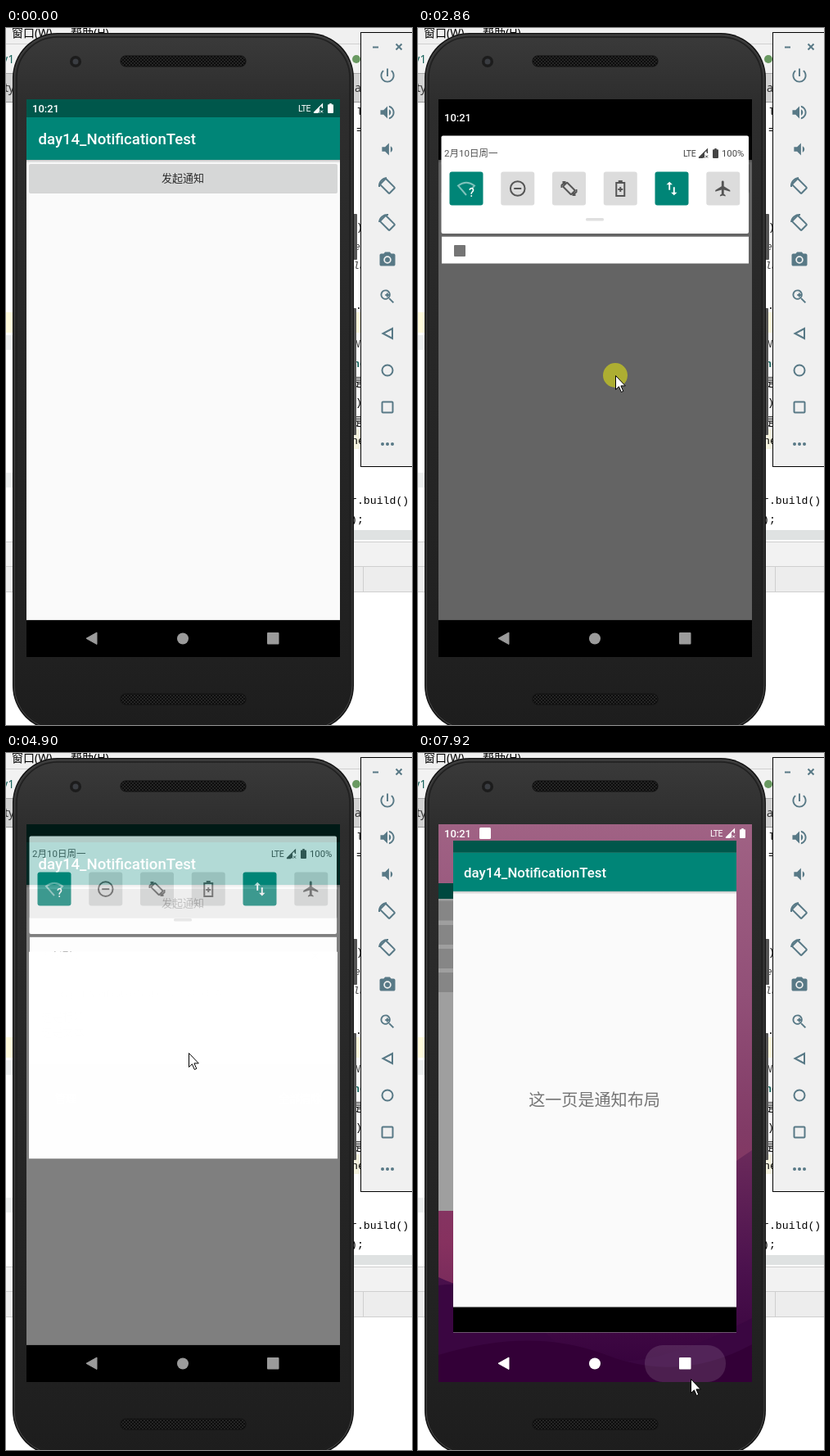
These frames come from a looping animation (496 px wide and 851 px high, 8000 ms). An HTML page:

```html
<!DOCTYPE html>
<html lang="zh-CN">
<head>
<meta charset="utf-8">
<title>Notification demo</title>
<style>
html, body { margin: 0; width: 100%; height: 100%; overflow: hidden; background: #fff; }
svg { display: block; width: 496px; height: 851px; }
text { font-family: Roboto, "Noto Sans CJK SC", "Noto Sans CJK JP", sans-serif; white-space: pre; }
.ide text { font-family: "Noto Sans", "Noto Sans CJK SC", sans-serif; font-size: 14px; }
.code text { font-family: "Liberation Mono", "Noto Sans CJK SC", monospace; font-size: 13.2px; }
.line { fill: none; stroke: currentColor; stroke-width: 2; }
.tools { color: #587986; fill: currentColor; }
.med { font-weight: 500; }
</style>
</head>
<body>
<svg viewBox="0 0 496 851">
<defs>
  <linearGradient id="body" x1="0" y1="0" x2="0" y2="1">
    <stop offset="0" stop-color="#3a3a3a"/><stop offset=".1" stop-color="#2d2d2d"/>
    <stop offset=".9" stop-color="#202020"/><stop offset="1" stop-color="#1d1d1d"/>
  </linearGradient>
  <linearGradient id="sky" x1="0" y1="0" x2="0" y2="1">
    <stop offset="0" stop-color="#a06284"/><stop offset=".3" stop-color="#925078"/>
    <stop offset=".55" stop-color="#813b66"/><stop offset=".75" stop-color="#86315f"/>
    <stop offset="1" stop-color="#5d1e54"/>
  </linearGradient>
  <linearGradient id="hill" x1="0" y1="0" x2="0" y2="1">
    <stop offset="0" stop-color="#6b2a5b"/><stop offset=".5" stop-color="#4c124e"/>
    <stop offset="1" stop-color="#33003a"/>
  </linearGradient>
  <linearGradient id="fade" x1="0" y1="0" x2="0" y2="1">
    <stop offset="0" stop-opacity=".22"/><stop offset="1" stop-opacity="0"/>
  </linearGradient>
  <pattern id="mesh" width="4" height="4" patternUnits="userSpaceOnUse">
    <rect width="4" height="4" fill="#252525"/>
    <circle cx="1" cy="1" r="1" fill="#050505"/><circle cx="3" cy="3" r="1" fill="#050505"/>
  </pattern>
  <clipPath id="screen"><rect x="25" y="87" width="383" height="681"/></clipPath>
  <clipPath id="cardClip"><rect id="cardBox" x="29" y="254.500" width="375" height="33"/></clipPath>
  <clipPath id="winClip"><rect id="winBox"/></clipPath>
  <g id="bars">
    <rect x="25" y="87" width="383" height="681" fill="#fafafa"/>
    <rect x="25" y="87" width="383" height="22" fill="#00574b"/>
    <rect x="25" y="109" width="383" height="52" fill="#008577"/>
    <rect x="25" y="161" width="383" height="4" fill="url(#fade)"/>
    <text class="med" x="39.500" y="142" font-size="18.600" fill="#fff">day14_NotificationTest</text>
    <rect x="25" y="722" width="383" height="1" fill="#ddd"/>
    <rect x="25" y="723" width="383" height="45"/>
  </g>
  <g id="signal">
    <path d="M11 1V5M1 11.500L11.500 1V6M1 11.500H6" fill="none" stroke="currentColor" stroke-width="1.200"/>
    <path d="M1 11.500L8 4.500V11.500Z" fill="currentColor"/>
    <path d="M9 8.500l3 3m0-3l-3 3" stroke="currentColor"/>
  </g>
  <path id="cell" d="M2.300 0h2.400v1.300H6q1 0 1 1V11q0 1-1 1H1q-1 0-1-1V2.300q0-1 1-1h1.300z"/>
  <g id="turn">
    <rect class="line" x="-5" y="-8" width="10" height="16" rx="1" transform="rotate(-45)"/>
    <path class="line" d="M-10 1A10 10 0 0 1-1-10" stroke-width="1.600"/>
  </g>
</defs>

<g class="ide">
  <rect width="496" height="851" fill="#fff"/>
  <rect width="496" height="19" fill="#f0f0f0"/>
  <rect y="19" width="496" height="1" fill="#d0d0d0"/>
  <rect y="20" width="496" height="35" fill="#f2f2f2"/>
  <rect y="55" width="496" height="36" fill="#d2d2d2"/>
  <rect y="55" width="496" height="1" fill="#aaa"/><rect y="90" width="496" height="1" fill="#999"/>
  <text x="7" y="11" font-size="14.500">窗口(W)</text><text x="79" y="11">帮助(H)</text>
  <text x="-5" y="43" fill="#17635c">y1</text><text x="-2" y="78" fill="#333">ty</text>
  <text x="426" y="78" fill="#333">a</text>
  <circle cx="428" cy="38" r="5" fill="#6a9a62"/>
  <rect y="347" width="496" height="25" fill="#fffbdc"/>
  <rect y="375" width="8" height="18" fill="#eef0f0"/><rect y="543" width="8" height="18" fill="#eef0f0"/>
  <rect x="408" y="490" width="30" height="24" fill="#f5f3df"/>
  <rect x="400" y="613" width="96" height="12" fill="#dfe2e2"/>
  <rect y="627" width="496" height="61" fill="#f2f2f2"/>
  <rect y="657" width="496" height="31" fill="#ededed"/>
  <path d="M0 627.500H496M0 657.500H496M0 688.500H496M436.500 658V688" stroke="#cfcfcf" fill="none"/>
  <g class="code" id="code"></g>
</g>

<g>
  <rect x="421" y="227" width="8" height="56" rx="1" fill="#555"/>
  <rect x="421" y="342" width="7" height="155" rx="1" fill="#555"/>
  <rect x="8" y="6" width="417" height="852" rx="55" fill="#151515"/>
  <rect x="10" y="8" width="413" height="848" rx="53" fill="url(#body)" stroke="#474747" stroke-width="1"/>
  <rect x="13" y="11" width="407" height="842" rx="50" fill="none" stroke="#1f1f1f" stroke-width="1.500"/>
  <circle cx="85" cy="41" r="7" fill="#1c1c1c"/><circle cx="85" cy="41" r="3.500" fill="#3a3d42"/>
  <rect x="140" y="34" width="153" height="13" rx="6" fill="url(#mesh)" stroke="#111"/>
  <rect x="140" y="813" width="153" height="13" rx="6" fill="url(#mesh)" stroke="#111"/>
</g>

<g clip-path="url(#screen)">
  <g id="home">
    <use href="#bars"/>
    <rect x="28" y="167" width="377" height="35" rx="2" fill="#bbb" opacity=".6"/>
    <rect x="28" y="166" width="377" height="35" rx="2" fill="#d6d7d7"/>
    <rect id="press" x="28" y="166" width="377" height="35" rx="2" fill="#c8c9c9"/>
    <text x="190" y="188.300" font-size="13" fill="#2b2b2b">发起通知</text>
  </g>

  <g id="wall">
    <rect x="25" y="87" width="383" height="681" fill="url(#sky)"/>
    <path d="M25 640Q130 690 250 600T408 485V768H25Z" fill="url(#hill)"/>
    <path d="M25 650Q90 640 160 712T408 690V768H25Z" fill="#3a0641"/>
    <path d="M25 735Q140 700 230 735T408 722V768H25Z" fill="#330037"/>
    <g id="past">
      <rect x="-300" y="159" width="343" height="400" fill="#9f9f9f"/>
      <rect x="-300" y="159" width="343" height="19" fill="#00483f"/>
      <path d="M-300 192.500H43M-300 222H43M-300 251H43M-300 280H43" stroke="#868686" stroke-width="24"/>
    </g>
  </g>

  <g id="shade">
    <rect id="scrim" x="25" y="87" width="383" height="636"/>
    <rect id="topDark" x="25" y="87" width="383" height="74"/>
    <text class="med" id="clock" x="32" y="114" font-size="13" fill="#fff">10:21</text>
    <g id="foot" font-size="13" fill="#fff">
      <text x="60" y="426">管理</text><text x="333" y="426">全部清除</text>
    </g>
    <g id="panel">
      <rect x="28.500" y="131.500" width="375.500" height="119.500" rx="2" fill="#fff"/>
      <text x="32" y="157.300" font-size="11.500" fill="#555">2月10日周一</text>
      <text x="324" y="157" font-size="10.500" letter-spacing="-.4" fill="#444">LTE</text>
      <use href="#signal" x="342" y="147" color="#444"/>
      <use href="#cell" x="360" y="147" fill="#444"/>
      <text x="371" y="157" font-size="11.300" fill="#444">100%</text>
      <g id="tiles"></g>
      <rect x="205" y="232" width="22" height="3.500" rx="1.500" fill="#e0e0e0"/>
      <g clip-path="url(#cardClip)">
        <rect x="29" y="254.500" width="375" height="400" fill="#fff"/>
        <rect id="dot" x="44" y="265" width="14" height="14" rx="1" fill="#757575"/>
        <g id="note" fill="#333">
          <text class="med" x="43" y="281.800" font-size="11.300">无声通知</text>
          <path d="M373.500 273.500l8 8m0-8l-8 8" stroke="#444" stroke-width="1.300"/>
          <rect x="29" y="299.500" width="375" height="1" fill="#ddd"/>
          <rect x="43.500" y="315" width="16.500" height="16.500" rx="1" fill="#757575"/>
          <text x="66" y="328" font-size="11.200">day14_NotificationTest • 这是小字 • 现在</text>
          <path d="M280 326q1-1 1-3.500a2.200 2.200 0 0 1 4.400 0q0 2.500 1 3.500zM282 327h2.500v1h-2.500zM278.500 321.500l1.500-2M288 321.500l-1.500-2" stroke="#555" stroke-width=".8" fill="#555"/>
          <text x="43" y="357" font-size="13.200">这是标题</text>
          <text x="43" y="375.500" font-size="13.200">这是文本</text>
        </g>
      </g>
    </g>
  </g>

  <g id="win"><g clip-path="url(#winClip)">
    <rect id="cover" x="25" y="87" width="383" height="681" fill="#fff"/>
    <g id="page">
      <use href="#bars"/>
      <text x="127" y="450.800" font-size="22.250" fill="#757575">这一页是通知布局</text>
    </g>
  </g></g>

  <g id="status" fill="#fff" color="#fff">
    <text class="med" x="32" y="103" font-size="13">10:21</text>
    <rect id="badge" x="75" y="91" width="14" height="14" rx="1.500"/>
    <text x="357" y="102" font-size="10.500" letter-spacing="-.5">LTE</text>
    <use href="#signal" x="375" y="92"/><use href="#cell" x="393" y="92"/>
  </g>
  <rect id="navBase" x="25" y="723" width="383" height="45"/>
  <rect id="pill" x="277" y="723" width="99" height="45" rx="22" fill="#fff"/>
  <g id="nav">
    <path d="M111 738V752.500L98 745.300Z" stroke="currentColor" stroke-width="1" stroke-linejoin="round" fill="currentColor"/>
    <circle cx="216" cy="745.500" r="7" fill="currentColor"/>
    <rect x="319" y="738" width="14.500" height="14.500" rx="1" fill="currentColor"/>
  </g>
</g>

<rect x="433.500" y="5.500" width="70" height="530" fill="#f0f0f0" stroke="#000"/>
<g class="tools" id="tools">
  <path class="line" d="M448 23.500h7M476.500 19.500l7 7m0-7l-7 7" stroke-width="1.300"/>
  <use href="#turn" x="466" y="193"/>
  <use href="#turn" transform="translate(466 238) scale(-1 1) rotate(90)"/>
  <circle cx="466" cy="283" r="3"/>
  <path class="line" d="M463.300 326h5m-2.500-2.500v5" stroke-width="1.200"/>
  <path class="line" d="M472 367V379L460.500 373Z" stroke-width="1.600"/>
  <circle class="line" cx="466" cy="418" r="6.500" stroke-width="1.600"/>
  <rect class="line" x="459.500" y="456.500" width="13" height="13" rx="1" stroke-width="1.600"/>
  <circle cx="460" cy="508" r="2"/><circle cx="466" cy="508" r="2"/><circle cx="472" cy="508" r="2"/>
</g>

<circle id="touch" r="15" fill="#adae32"/>
<path id="cursor" d="M.5.500V17.500L4.400 13.800L7.300 20.500L9.800 19.400L6.900 12.900H12.300Z" fill="#fff" stroke="#000" stroke-width="1"/>
</svg>

<script>
const el = {};
document.querySelectorAll('[id]').forEach(n => el[n.id] = n);

const icon = (d, x, y, s, fill) =>
  `<path transform="translate(${x} ${y}) scale(${s}) translate(-12 -12)" fill-rule="evenodd" fill="${fill}" d="${d}"/>`;

// Emulator toolbar
el.tools.insertAdjacentHTML('afterbegin', [
  [58, 'M13 3h-2v10h2V3zm4.830 2.170l-1.420 1.420C17.990 7.860 19 9.810 19 12c0 3.870-3.130 7-7 7s-7-3.130-7-7c0-2.190 1.010-4.140 2.580-5.420L6.170 5.170C4.230 6.820 3 9.260 3 12c0 4.970 4.030 9 9 9s9-4.030 9-9c0-2.740-1.230-5.180-3.170-6.830z'],
  [103, 'M3 9v6h4l5 5V4L7 9H3zm13.500 3c0-1.770-1.020-3.290-2.500-4.030v8.050c1.480-.73 2.500-2.250 2.500-4.020zM14 3.230v2.060c2.890.86 5 3.540 5 6.710s-2.110 5.850-5 6.710v2.060c4.010-.91 7-4.490 7-8.770s-2.990-7.860-7-8.770z'],
  [148, 'M18.500 12c0-1.770-1.020-3.290-2.500-4.030v8.050c1.480-.73 2.500-2.250 2.500-4.020zM5 9v6h4l5 5V4L9 9H5z'],
  [283, 'M9 2L7.170 4H4c-1.100 0-2 .9-2 2v12c0 1.100.9 2 2 2h16c1.100 0 2-.9 2-2V6c0-1.100-.9-2-2-2h-3.170L15 2H9zm3 15a5 5 0 1 1 0-10a5 5 0 1 1 0 10z'],
  [328, 'M15.500 14h-.79l-.28-.27A6.500 6.500 0 1 0 13.730 14.430l.27.28v.79l5 4.990L20.490 19zM9.500 14a4.500 4.500 0 1 1 0-9a4.500 4.500 0 1 1 0 9z']
].map(([y, d]) => icon(d, 466, y, .95, 'currentColor')).join(''));

// Quick settings
const tileArt = [
  `<path class="line" d="M0 8L-10-3.500Q0-11 10-3.500L7 0" stroke-width="1.300" opacity=".5"/>
   <text class="med" x="3" y="10" font-size="14" fill="#fff">?</text>`,
  `<circle class="line" r="8.800"/><path class="line" d="M-4.500 0h9"/>`,
  `<rect class="line" x="-3.500" y="-7" width="7" height="14" rx="1" transform="rotate(-45)" stroke-width="1.800"/>
   <path class="line" d="M-9-1V-4L-5-8M-8-8h3v3M9 1V4L5 8M8 8h-3v-3" stroke-width="1.500"/>`,
  `<path class="line" d="M-5-7H5V9H-5ZM-2.500-9h5M-3 1h6M0-2v6" stroke-width="1.900"/>`,
  icon('M16 17.010V10h-2v7.010h-3L15 21l4-3.990h-3zM9 3L5 6.990h3V14h2V6.990h3L9 3z', 0, 0, .93, 'currentColor'),
  icon('M21 16v-2l-8-5V3.500c0-.83-.67-1.500-1.500-1.500S10 2.670 10 3.500V9l-8 5v2l8-2.500V19l-2 1.500V22l3.500-1 3.500 1v-1.500L13 19v-5.500l8 2.500z', 0, 0, .95, 'currentColor')
];
el.tiles.innerHTML = tileArt.map((art, i) => {
  const on = i % 4 === 0;
  return `<g transform="translate(${59 + i * 62.75} 196)" color="${on ? '#fff' : '#555'}">
    <rect x="-20.500" y="-20.500" width="41" height="41" rx="3" fill="${on ? '#008577' : '#dcdcdc'}"/>${art}</g>`;
}).join('');

// Code peeking out beside the phone
const it = 'font-style="italic" fill="#444"', bold = 'font-weight="700" fill="#17635c"';
el.code.innerHTML = [
  [428, 106, 'l:'], [428, 128, '='], [428, 247, ')'], [425, 271, 'ei', it], [424, 294, 'la', it],
  [427, 343, '.'], [425, 390, 'N', it], [424, 414, 'ne', bold], [423, 437, '是'], [427, 461, ')'],
  [423, 485, '是'], [422, 508, 'ne'], [421, 581, 'r.build()'], [421, 604, ');']
].map(([x, y, s, a = '']) => `<text x="${x}" y="${y}" ${a}>${s}</text>`).join('');

const bursts = [[300, 1060, 11], [1150, 1380, 4], [1610, 1690, 2], [2000, 2470, 7], [2620, 3420, 11],
  [3500, 3880, 6], [4200, 4200, 1], [4350, 4350, 1], [4750, 5210, 7], [6770, 7230, 7],
  [7380, 7690, 5], [7840, 7920, 2]];
function snap(t) {
  const b = bursts.filter(b => b[0] <= t).pop();
  if (!b) return 0;
  const [from, to, n] = b;
  if (n < 2) return from;
  const d = (to - from) / (n - 1);
  return from + d * Math.min(n - 1, Math.floor((t - from) / d + .01));
}

// Piecewise track of [time, value]
function track(t, keys) {
  if (t <= keys[0][0]) return keys[0][1];
  for (let i = 1; i < keys.length; i++) {
    const [a, u] = keys[i - 1], [b, v] = keys[i];
    if (t <= b) return u + (v - u) * (t - a) / (b - a);
  }
  return keys[keys.length - 1][1];
}
const ease = x => x * x * (3 - 2 * x);
const mix = (a, b, k) => a + (b - a) * k;

const path = [[300, 371, 760], [985, 218, 190], [1924, 218, 190], [2470, 222, 98], [2620, 222, 98],
  [2700, 225, 160], [2780, 235, 295], [2860, 241, 424], [2940, 242, 500], [3020, 241, 533],
  [3260, 241, 533], [3424, 249, 499], [3880, 223, 366], [6693, 223, 366], [7230, 326, 767],
  [7457, 326, 767], [7690, 333, 764]];
function pointer(t) {
  const i = path.findIndex(p => p[0] >= t);
  if (i < 1) return (i ? path[path.length - 1] : path[0]).slice(1);
  const [a, x, y] = path[i - 1], [b, x2, y2] = path[i];
  let k = (t - a) / (b - a);
  if (b - a > 200) k = ease(k);
  return [mix(x, x2, k), mix(y, y2, k)];
}
const touches = [[1060, 1150], [2620, 3095], [4200, 4350], [7380, 7530]];

const set = (n, o) => { for (const k in o) n.setAttribute(k, o[k]); };
const show = (n, o) => set(n, { opacity: +o, visibility: o > 0 ? 'visible' : 'hidden' });

function render(time) {
  const t = snap(time);
  const [x, y] = pointer(t), at = `translate(${x} ${y})`;
  set(el.cursor, { transform: at });
  set(el.touch, { transform: at });
  show(el.cursor, t >= 300);
  show(el.touch, touches.some(([a, b]) => t >= a && t < b));

  show(el.press, track(t, [[1060, 0], [1380, 1]]));
  show(el.badge, track(t, [[1530, 0], [1690, 1]]));

  // Notification shade
  const open = track(t, [[2620, 0], [2700, .3], [2780, .75], [2860, 1]]);
  const grow = ease(track(t, [[2860, 0], [3180, 1]]));
  const dy = (open - 1) * 150 + track(t, [[4673, 0], [4750, -4.5], [4827, -30], [4980, -130]]);
  show(el.shade, t < 2620 ? 0 : track(t, [[4760, 1], [4980, 0]]));
  show(el.scrim, open * .6 + grow * .1);
  show(el.topDark, open);
  show(el.clock, open);
  show(el.foot, grow);
  show(el.panel, Math.min(1, open * 1.3));
  show(el.dot, 1 - grow);
  show(el.note, grow);
  set(el.panel, { transform: `translate(0 ${dy})` });
  set(el.cardBox, { height: mix(33, 143.5, grow) + track(t, [[4673, 0], [4750, 11.5]]) });
  show(el.status, open === 0 || t >= 4975);

  // Opened page: grows out of the card, later shrinks into recents
  const fill = track(t, [[4750, 0], [4827, .25], [4903, .7], [4980, .93], [5056, 1]]);
  const over = track(t, [[7760, 0], [7840, .45], [7920, 1]]);
  const top = mix(294.5, 87, fill) + 5.5 * over, end = mix(405, 768, fill) - 11 * over;
  const left = mix(29, 25, fill), s = mix(1, .9034, over);
  show(el.win, t >= 4750);
  show(el.cover, track(t, [[4750, .45], [4827, 1]]));
  show(el.page, track(t, [[4827, 0], [4980, 1]]));
  set(el.winBox, { x: left, y: top, width: 433 - 2 * left, height: end - top });
  set(el.win, { transform: `translate(${mix(25, 43, over)} ${mix(87, 102, over)}) scale(${s}) translate(-25 -87)` });
  show(el.wall, over > 0);
  set(el.past, { transform: `translate(${(over - 1) * 40} 0)` });

  // Navigation bar
  const tint = Math.round(track(t, [[7380, 155], [7690, 255]]));
  set(el.nav, { color: `rgb(${tint},${tint},${tint})` });
  show(el.navBase, over === 0);
  show(el.pill, track(t, [[7300, 0], [7535, .12]]));
}

const begin = performance.now();
function frame() {
  render((performance.now() - begin) % 8000);
  requestAnimationFrame(frame);
}
frame();
</script>
</body>
</html>
```
